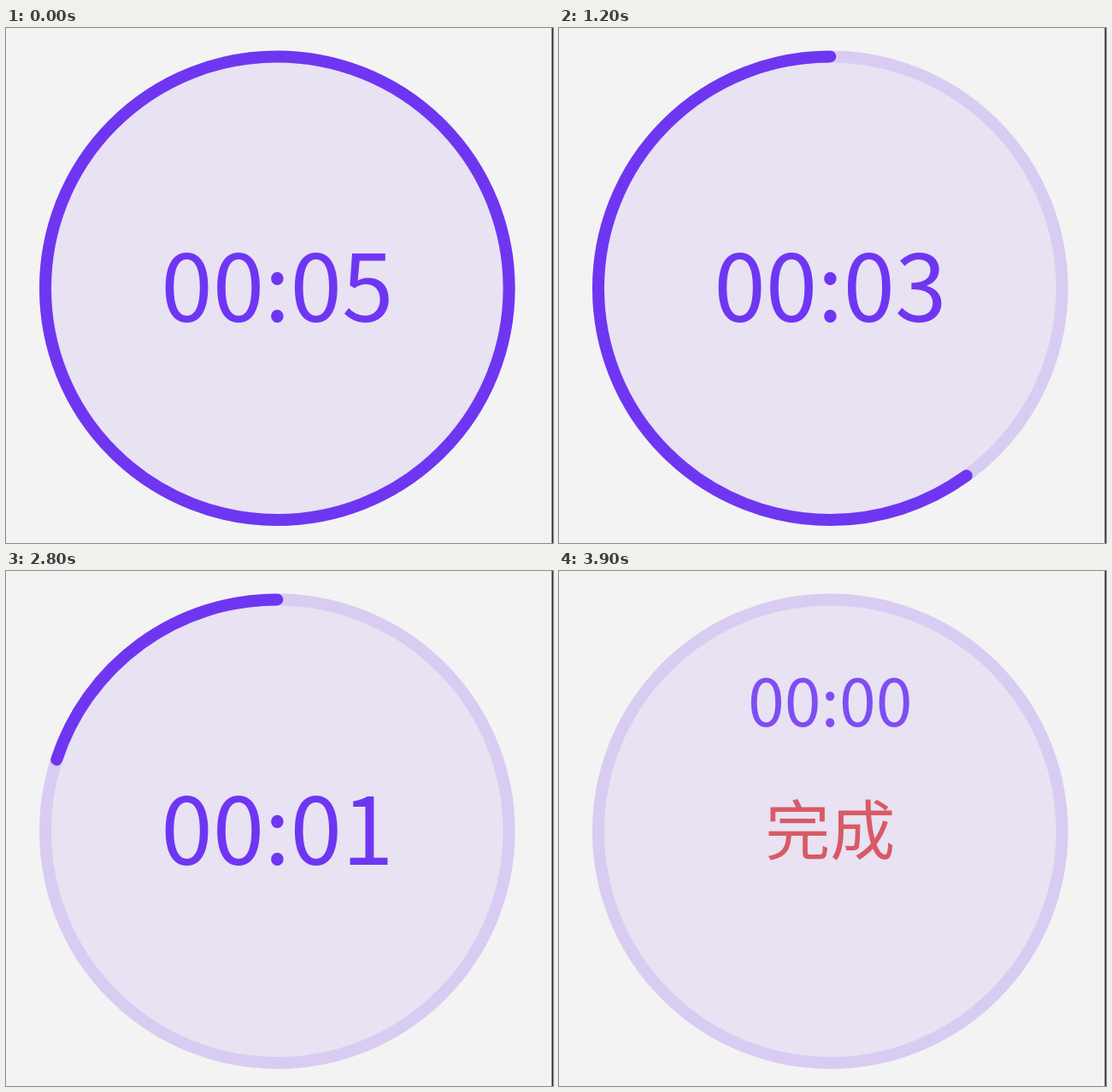
An HTML page for the animation above (4000 ms loop, 640 px wide and 603 px high).

```html
<!DOCTYPE html>
<html lang="zh-CN">
<head>
<meta charset="utf-8">
<title>Countdown</title>
<style>
  html, body { margin: 0; width: 100%; height: 100%; overflow: hidden; background: #f3f3f3; }
  svg { display: block; width: 640px; height: 603px; }
  circle { stroke-width: 14; }
  text { font-family: "Noto Sans CJK SC", "Noto Sans CJK", sans-serif; text-anchor: middle; fill: #6f36f2; }
  #clock { font-size: 109px; }
  #done { font-size: 77px; }
  #done .label { fill: #d64550; font-size: 76px; }
</style>
</head>
<body>
<svg viewBox="0 0 640 603">
  <rect x="638.5" width="1.5" height="603" fill="#2b2b33"/>
  <g transform="translate(317.3 304.7) rotate(-90) scale(1 -1)">
    <circle r="271.3" fill="#e8e2f2" stroke="#d9ccf2"/>
    <circle id="ring" r="271.3" fill="none" stroke="#6f36f2" stroke-linecap="round" pathLength="5"/>
  </g>
  <text id="clock" x="317.3" y="344"></text>
  <g id="done">
    <text x="317.3" y="182">00:00</text>
    <text class="label" x="317.3" y="332">完成</text>
  </g>
</svg>
<script>
  const LOOP = 4000, FIRST_TICK = 20, TICK = 925, FADE = 210;
  const DONE_AT = FIRST_TICK + 4 * TICK;
  const [ring, clock, done] = ["ring", "clock", "done"].map(id => document.getElementById(id));

  function draw(now) {
    const t = now % LOOP;
    const left = 4 - Math.floor((t - FIRST_TICK) / TICK);
    const running = left > 0 ? "visible" : "hidden";

    ring.setAttribute("stroke-dasharray", `${left} 9`);
    ring.style.visibility = clock.style.visibility = running;
    clock.textContent = `00:0${left}`;
    done.style.opacity = Math.min(1, Math.max(0, (t - DONE_AT) / FADE));
    requestAnimationFrame(draw);
  }
  draw(performance.now());
</script>
</body>
</html>
```
